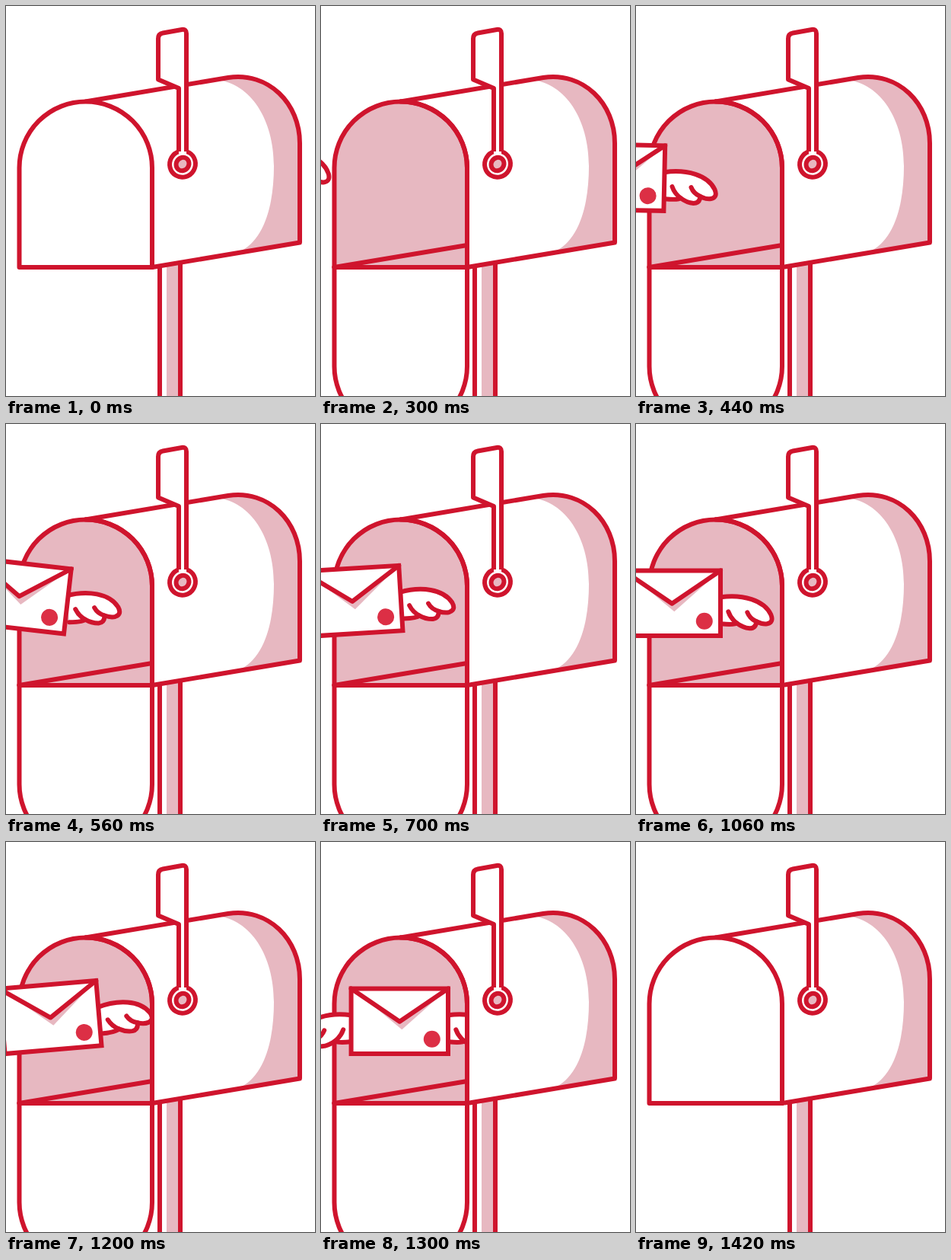
An HTML page for the animation above (2.4 s loop, 406 px wide and 512 px high).

```html
<!DOCTYPE html>
<html lang="en">
<head>
<meta charset="utf-8">
<title>Mailbox</title>
<style>
  html, body { margin: 0; width: 100%; height: 100%; overflow: hidden; background: #fff; }
  svg { display: block; width: 100vw; height: 100vh; }
  .line { fill: none; stroke: #cf142d; stroke-width: 6; stroke-linejoin: round; stroke-linecap: round; }
  .white { fill: #fff; }
  .pink { fill: #e7b8c1; }
</style>
</head>
<body>
<svg viewBox="0 0 406 512">
  <defs>
    <clipPath id="opening">
      <path d="M-300 0H104.500V125.500A87.500 87 0 0 1 192 212.500V600H-300Z"/>
    </clipPath>
    <g id="wing">
      <path class="line white" d="M64-8C93-12 121-4 130 15Q134 25 125 27Q119 28 111 24Q110 33 102 33Q93 32 85 26Q83 29 64 27"/>
      <path class="line" d="M111 24Q102 20 99 12M85 26Q77 20 74 11"/>
    </g>
  </defs>

  <!-- post -->
  <path class="pink" d="M211 335H229V520H211Z"/>
  <path class="line" d="M202 340V520M229 336V520"/>

  <!-- body -->
  <path class="white" d="M104.500 125.500L292 94C345 86 386 128 386 180V310.500L192 343Z"/>
  <path class="pink" d="M276 97L292 94C345 86 386 128 386 180V310.500L306 323C338 309 352 264 352 210C352 150 322 101 276 97Z"/>
  <path class="line" d="M104.500 125.500L292 94C345 86 386 128 386 180V310.500L192 343"/>

  <!-- flag -->
  <ellipse class="line white" cx="232" cy="207.500" rx="16.800" ry="17.300" transform="rotate(30 232 207.500)"/>
  <path class="white" d="M227 108H237V194H227Z"/>
  <path class="line white" style="stroke-linecap:butt" d="M227 191V108L200 96.500V43Q200 36.500 206 35.500L231 31Q237 30 237 36V191"/>
  <ellipse class="line pink" cx="232" cy="207.500" rx="8.200" ry="9" transform="rotate(35 232 207.500)"/>

  <!-- front -->
  <path id="front" class="line white" d="M17.500 343V212.500A87.250 87 0 0 1 192 212.500V343Z"/>

  <g id="open">
    <path class="line white" d="M17.500 343V473A87.250 87 0 0 0 192 473V343Z"/>
    <path class="line" d="M17.500 343L192 314"/>
    <g clip-path="url(#opening)">
      <g id="letter">
        <g id="right"><use href="#wing"/></g>
        <g id="left"><use href="#wing" transform="scale(-1 1)"/></g>
        <path class="white" d="M-63.700-42.800H63.700V42.800H-63.700Z"/>
        <path class="pink" d="M-45-29L3 11L48-29Z"/>
        <path class="line white" d="M-63.700-42.800L0 .500L63.700-42.800"/>
        <path class="line" style="stroke-linejoin:miter" d="M-63.700-42.800H63.700V42.800H-63.700Z"/>
        <circle cx="42.500" cy="23.500" r="11" fill="#dc2f45"/>
      </g>
    </g>
    <path class="line" d="M104.500 125.500A87.500 87 0 0 1 192 212.500V343"/>
  </g>
</svg>
<script>
  const LOOP = 2400, STEP = 20, OPEN = 300, SHUT = 1420;
  const ARRIVE = 900, LEAVE = 1060, SETTLE = 1260;
  const $ = id => document.getElementById(id);
  const set = (id, value) => $(id).setAttribute('transform', value);

  function draw(t) {
    const open = t >= OPEN && t < SHUT;
    $('open').style.display = open ? '' : 'none';
    $('front').style.fill = open ? '#e7b8c1' : '#fff';
    if (!open) return;

    // Glide in, hover while rocking, then dart into the box.
    const far = Math.max(0, (ARRIVE - t) / (ARRIVE - OPEN)) ** 3;
    const dart = Math.max(0, (t - LEAVE) / 240) ** 3;
    const rock = t < SETTLE ? Math.sin((t - 860) / 200 * Math.PI) : 0;
    const lift = rock * rock;

    const x = 47.300 - 163.500 * far + 56 * dart;
    const y = 235.300 - 8 * lift - 48 * far * far;
    const tilt = 6 * rock + 15 * far * far;
    const flap = 13.500 * lift;
    set('letter', `translate(${x} ${y}) rotate(${tilt})`);
    set('right', `rotate(${-flap} 66 5)`);
    set('left', `rotate(${flap} -66 5)`);
  }

  const start = performance.now();
  function tick() {
    const t = (performance.now() - start) % LOOP;
    draw(t - t % STEP);
    requestAnimationFrame(tick);
  }
  tick();
</script>
</body>
</html>
```
